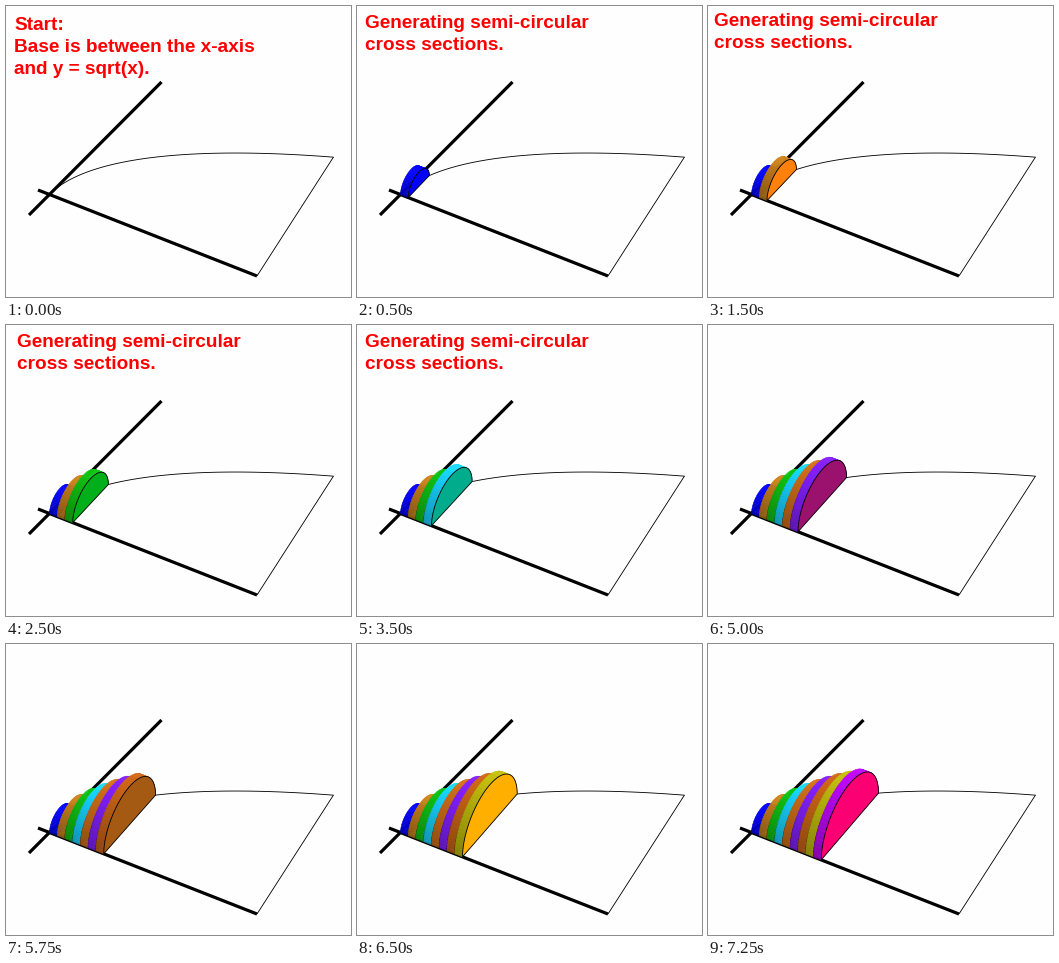
Animation of 345 by 291 pixels, one loop 8 s. Source, as a matplotlib script:

```python
import numpy as np
import matplotlib.pyplot as plt
from matplotlib.animation import FuncAnimation
from matplotlib.collections import PolyCollection

W, H, DPI = 345, 291, 64
PX = 72 / DPI  # points per pixel
STEP = 250     # ms per frame
FRAMES = 32
THIN, THICK = 0.85, 3.2

plt.rcParams["font.family"] = "Liberation Sans"
fig = plt.figure(figsize=(W / DPI, H / DPI), dpi=DPI, facecolor="#fefefe")
ax = fig.add_axes([0, 0, 1, 1])
ax.set(xlim=(0, W), ylim=(H, 0))
ax.axis("off")


def rgb(r, g, b):
    return np.array([r, g, b]) / 255


def base(u):
    """Point on the x-axis, u slab widths from the origin."""
    return np.array([43.5 + 7.75 * u, 188.5 + 3.045 * u])


def span(u):
    """Screen vector from the x-axis to the curve y = sqrt(x)."""
    return np.sqrt(u) * np.array([21.3 - 0.245 * u, -21.9 - 0.04 * u])


def line(x, y, width):
    ax.plot(x, y, color="black", lw=width * PX, solid_capstyle="butt", zorder=1)


def arc(n, start):
    """Semicircle for slab n, standing at position start on the axis."""
    t = np.linspace(np.pi, 0, 41)[:, None]
    d = span(n)
    up = np.array([0, -14.4 * np.sqrt(n)])
    return base(start) + d / 2 * (1 + np.cos(t)) + up * np.sin(t)


def slab(n, side, face):
    z = 2 + n
    back, front = arc(n, n - 1), arc(n, n)
    quads = np.stack([back[:-1], back[1:], front[1:], front[:-1]], axis=1)
    light = np.clip(np.linspace(0.85, 1.6, len(quads)), 0, 1.25)
    tint = np.clip(light[:, None] * side, 0, 1)
    skin = PolyCollection(quads, facecolors=tint, edgecolors=tint,
                          linewidths=0.5, zorder=z)
    ax.add_collection(skin)
    cap = ax.fill(*front.T, facecolor=face, edgecolor="black",
                  lw=THIN * PX, zorder=z + 0.3)[0]
    return [skin, cap]


def caption(lines, x, y):
    return [ax.text(x, y + 22 * i, s, color="red", size=19 * PX,
                    weight="bold", va="baseline", zorder=20)
            for i, s in enumerate(lines)]


# Axes, curve and far edge of the base region
line([32, 251], [184, 270], THICK)
line([23, 155.5], [209, 76], THICK)
line([251, 327.5], [270, 151], THIN)
u = np.linspace(0, 1, 120) ** 2 * 26.8
line(*np.array([base(v) + span(v) for v in u]).T, THIN)

# Side and face colour of each slab
COLORS = [
    (rgb(0, 0, 215), rgb(0, 0, 255)),
    (rgb(165, 105, 20), rgb(255, 128, 10)),
    (rgb(10, 160, 15), rgb(0, 175, 25)),
    (rgb(20, 175, 215), rgb(0, 172, 140)),
    (rgb(172, 90, 18), rgb(200, 100, 10)),
    (rgb(108, 25, 215), rgb(155, 18, 110)),
    (rgb(168, 84, 18), rgb(165, 90, 20)),
    (rgb(158, 155, 10), rgb(255, 175, 0)),
    (rgb(155, 5, 205), rgb(250, 0, 114)),
]
slabs = [slab(n, *c) for n, c in enumerate(COLORS, 1)]

START = ["Start:", "Base is between the x-axis", "and y = sqrt(x)."]
BUILD = ["Generating semi-circular", "cross sections."]
captions = [caption(START, 8.2, 24)]
captions += [caption(BUILD, x, y) for x, y in
             [(8.2, 22.3), (6.2, 20.3), (11.2, 22.3), (8.2, 22.3), (9.2, 20.5)]]

TIMES = [500, 1500, 2500, 3500, 4250, 5000, 5750, 6500, 7250]


def update(i):
    count = sum(i * STEP >= t for t in TIMES)
    for k, parts in enumerate(slabs):
        for p in parts:
            p.set_visible(k < count)
    for k, parts in enumerate(captions):
        for p in parts:
            p.set_visible(k == count)
    return []


anim = FuncAnimation(fig, update, frames=FRAMES, interval=STEP,
                     init_func=lambda: update(0), repeat=True,
                     repeat_delay=0, blit=False)
plt.show()
```
